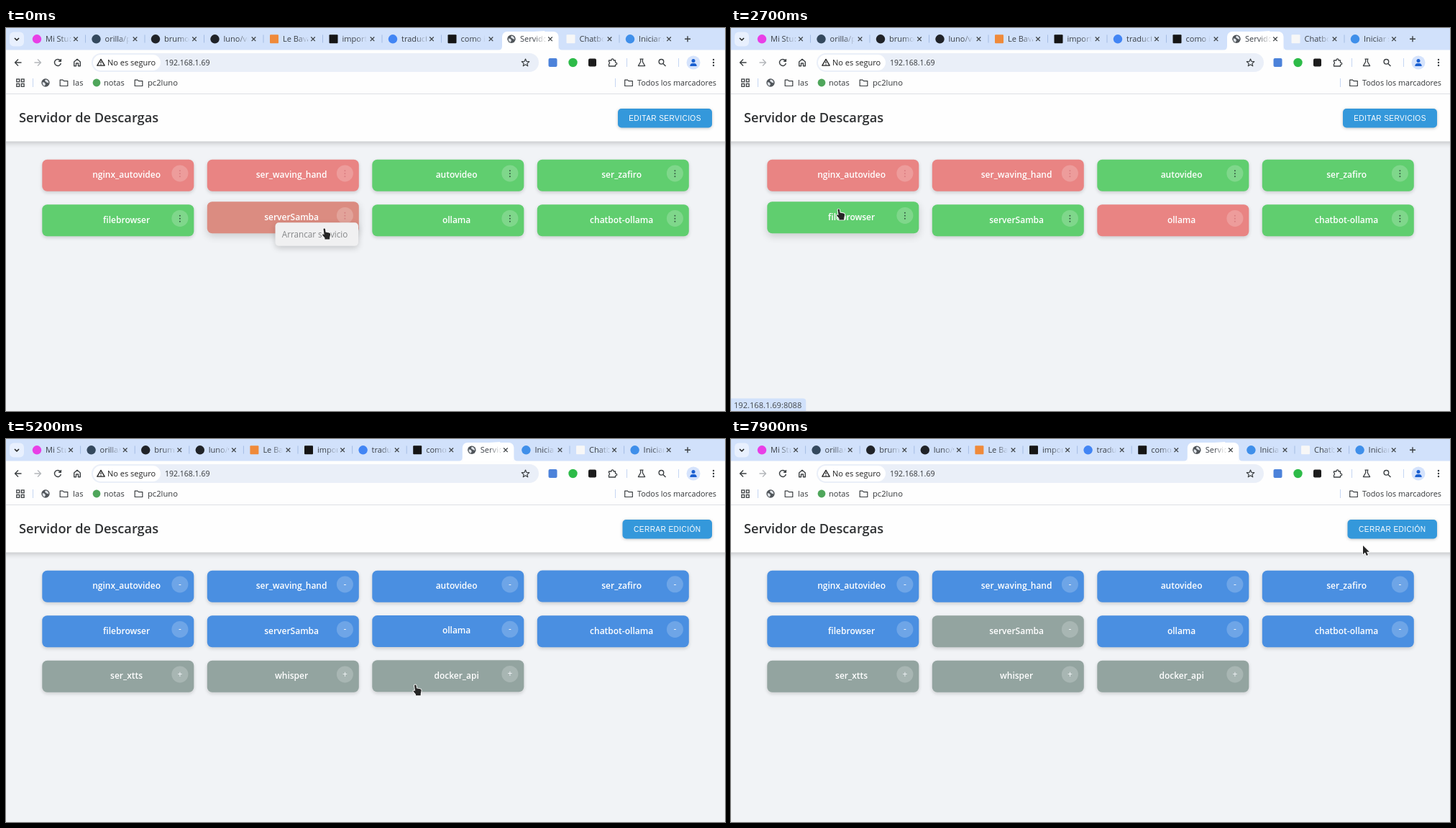
These frames come from a looping animation (1000 px wide and 532 px high, 8 s). An HTML page with a canvas:

```html
<!DOCTYPE html>
<html lang="es">
<head>
<meta charset="utf-8">
<title>Servidor de Descargas</title>
<style>
  html, body { margin: 0; width: 100%; height: 100%; overflow: hidden; background: #f1f3f6; }
  canvas { display: block; }
</style>
</head>
<body>
<canvas id="stage" width="1000" height="532"></canvas>
<script>
const c = document.getElementById('stage').getContext('2d');
const LOOP = 8000;
const UI = '"Open Sans", "Noto Sans", sans-serif';
const ARIAL = '"Liberation Sans", Arial, sans-serif';
const ROBOTO = 'Roboto, sans-serif';
const INK = '#3c4043', STRIP = '#d1e1fb';

// Moments of the story, in ms
const T = { started: -30, menuOpen: 1250, stopped: 1700, newTab: 3000, login: 3200,
  bubble: 3400, back: 4000, edit: 4850, removed: 6350 };

// Pointer tip: time, x, y
const PATH = [
  [0, 443, 279], [150, 443, 279], [500, 619, 258], [800, 619, 258], [1150, 701, 260],
  [1300, 701, 260], [1550, 672, 280], [1850, 672, 280], [2400, 150, 252], [2950, 150, 252],
  [3400, 247, 209], [3600, 247, 209], [3930, 668, 14], [4030, 668, 14], [4300, 953, 121],
  [4900, 953, 121], [5300, 500, 382], [5520, 500, 318], [5780, 471, 262], [6850, 471, 262],
  [7550, 879, 148]
];

const RED = [233, 132, 131], GREEN = [96, 206, 111], BLUE = [74, 143, 225], GREY = [147, 164, 160];
const SERVICES = ['nginx_autovideo', 'ser_waving_hand', 'autovideo', 'ser_zafiro',
  'filebrowser', 'serverSamba', 'ollama', 'chatbot-ollama', 'ser_xtts', 'whisper', 'docker_api'];
const PORTS = [8080, 7860, 8501, 8502, 8088, 445, 11434, 3000];

const clamp = v => Math.max(0, Math.min(1, v));
const smooth = v => v * v * (3 - 2 * v);
const mix = (a, b, k) => a.map((v, i) => v + (b[i] - v) * k);
const rgb = v => `rgb(${v.map(Math.round).join()})`;
const ramp = (t, start, length) => clamp((t - start) / length);
const inside = (p, x, y, w, h) => p.x >= x && p.x <= x + w && p.y >= y && p.y <= y + h;

function rect(x, y, w, h, color, r = 0) {
  c.fillStyle = color;
  c.beginPath();
  c.roundRect(x, y, w, h, r);
  c.fill();
}

function disc(x, y, r, color) {
  c.fillStyle = color;
  c.beginPath();
  c.arc(x, y, r, 0, Math.PI * 2);
  c.fill();
}

function text(s, x, y, size, color = '#333639', { font = UI, weight = 400, align = 'left', gap = 0 } = {}) {
  c.font = `${weight} ${size}px ${font}`;
  c.letterSpacing = gap + 'px';
  c.textAlign = align;
  c.fillStyle = color;
  c.fillText(s, x, y);
  c.letterSpacing = '0px';
}

function icon(d, x, y, color = INK, width = 1.4, fill = false) {
  c.save();
  c.translate(x, y);
  c.strokeStyle = c.fillStyle = color;
  c.lineWidth = width;
  c.lineJoin = 'round';
  const p = new Path2D(d);
  if (fill) c.fill(p); else c.stroke(p);
  c.restore();
}

function shadowed(blur, dy, alpha, draw) {
  c.save();
  c.shadowColor = `rgba(0,0,0,${alpha})`;
  c.shadowBlur = blur;
  c.shadowOffsetY = dy;
  draw();
  c.restore();
}

function dots(x, y, color, gap = 4, r = 1.1) {
  for (let i = -1; i <= 1; i++) disc(x, y + i * gap, r, color);
}

const SHAPE = {
  arrow: 'M4.5 0H-4.5M0 -4.5L-4.5 0L0 4.5',
  forward: 'M-4.5 0H4.5M0 -4.5L4.5 0L0 4.5',
  reload: 'M3.6 -2.8A4.5 4.5 0 1 0 4.4 1M4.4 -5V-1.7H1.1',
  home: 'M-4.3 4.7V-1L0 -4.7L4.3 -1V4.7H1.5V1H-1.5V4.7Z',
  star: 'M0 -5L1.5 -1.6L5.2 -1.3L2.4 1.1L3.2 4.8L0 2.8L-3.2 4.8L-2.4 1.1L-5.2 -1.3L-1.5 -1.6Z',
  puzzle: 'M-5 -3H-1.5A1.6 1.6 0 1 1 1.5 -3H4V0A1.6 1.6 0 1 1 4 3V5H-5V2A1.6 1.6 0 0 0 -5 -1Z',
  flask: 'M-2.5 -4.8H2.5M-1.4 -4.8V-1L-4.6 4.6H4.6L1.4 -1V-4.8',
  search: 'M2.2 -1.2A3.3 3.3 0 1 1 -4.4 -1.2A3.3 3.3 0 1 1 2.2 -1.2ZM1.4 1.4L5 5',
  folder: 'M-5.3 -4.2H-1.5L0 -2.7H5.3V4.2H-5.3Z',
  warn: 'M0 -4.6L5.2 4.2H-5.2ZM0 -1.6V1.3M0 2.2V3.2',
  close: 'M-2.8 -2.8L2.8 2.8M2.8 -2.8L-2.8 2.8',
  plus: 'M-4 0H4M0 -4V4',
  chevron: 'M-3 -1.5L0 1.5L3 -1.5',
  land: 'M-4 -1L-1 0L0 2.5L-1.6 4.4A4.6 4.6 0 0 1 -4 -1ZM0 -4.6L-1 -2.4L1.4 -.6L4.2 .6A4.6 4.6 0 0 0 0 -4.6Z',
  pointer: 'M0 0V12.2L2.9 9.6L4.9 14L7 13L5 8.8H8.8Z',
  hand: 'M-1.5 .6C-1.5 -.8 .8 -.8 1 .6L1.5 4.4L6.5 5.4C8 5.8 8.3 6.8 8 8.4L7.2 12V14.4H.4V12.6L-2.8 8.8C-3.4 7.6 -2 7 -1 7.8L-.4 8.2Z'
};

function globe(x, y) {
  disc(x, y, 5.7, '#50555a');
  icon(SHAPE.land, x, y, '#dfe3e8', 1, true);
}

function cursorAt(t) {
  const i = PATH.findIndex(k => k[0] > t);
  if (i < 0) return { x: PATH.at(-1)[1], y: PATH.at(-1)[2] };
  const a = PATH[Math.max(0, i - 1)], b = PATH[i];
  const k = smooth(ramp(t, a[0], b[0] - a[0] || 1));
  return { x: a[1] + (b[1] - a[1]) * k, y: a[2] + (b[2] - a[2]) * k };
}

const onPanel = t => t < T.newTab || t >= T.back;
const cardPos = i => ({ x: 50.3 + (i % 4) * 229.5, y: 182.7 + Math.floor(i / 4) * 62.5 });

function cardAt(t) {
  if (!onPanel(t)) return -1;
  const p = cursorAt(t), n = t < T.edit ? 8 : 11;
  for (let i = 0; i < n; i++) {
    const { x, y } = cardPos(i);
    if (inside(p, x, y, 211, 44)) return i;
  }
  return -1;
}

function onButton(t) {
  const x = t < T.edit ? 851 : 857;
  return onPanel(t) && inside(cursorAt(t), x, 111, 982 - x, 27);
}

// Share of the last moments for which a test held: gives hover transitions
function hover(t, test) {
  let n = 0;
  for (let k = 0; k < 10; k++) n += test(Math.max(0, t - k * 25)) ? 1 : 0;
  return smooth(n / 10);
}

function cardColor(i, t) {
  if (t >= T.edit) {
    if (i > 7) return GREY;
    return i === 5 ? mix(BLUE, GREY, ramp(t, T.removed, 300)) : BLUE;
  }
  if (i === 5) return mix(RED, GREEN, ramp(t, T.started, 300));
  if (i === 6) return mix(GREEN, RED, ramp(t, T.stopped, 250));
  return i < 2 ? RED : GREEN;
}

function drawCard(i, t) {
  const { x, y: top } = cardPos(i);
  const up = hover(t, s => cardAt(s) === i), y = top - 4 * up;
  const color = cardColor(i, t), edit = t >= T.edit;
  shadowed(5 + 6 * up, 2 + 2 * up, .16, () => rect(x, y, 211, 44, rgb(color), 7));
  text(SERVICES[i], x + 117.3, y + 25.4, 12, '#fff', { weight: 600, align: 'center' });

  const bx = x + 191.6, by = y + 19.2;
  const p = cursorAt(t), hot = edit && onPanel(t) && Math.hypot(p.x - bx, p.y - by) < 11.5;
  disc(bx, by, 11.5, `rgba(255,255,255,${hot ? .42 : .2})`);
  if (edit) text(i > 7 ? '+' : '-', bx, by + 4, 12, '#f4f7fa', { align: 'center' });
  else dots(bx, by + .3, color[0] > 180 ? 'rgba(200,100,110,.55)' : 'rgba(35,60,50,.8)', 4, 1);
}

function drawMenu(i, label, alpha) {
  if (alpha <= 0) return;
  const { x, y } = cardPos(i);
  c.save();
  c.globalAlpha = alpha;
  shadowed(8, 3, .18, () => rect(x + 94.7, y + 25, 115.5, 32.5, '#f0f0f1', 5));
  text(label, x + 104, y + 45.3, 11.7, '#858789');
  c.restore();
}

function drawButton(t) {
  const edit = t >= T.edit, x = edit ? 857.5 : 851, w = 982 - x;
  const k = hover(t, onButton), y = 112 - 1.5 * k;
  shadowed(4 + 4 * k, 1 + 2 * k, .22, () =>
    rect(x, y, w, 26.5, rgb(mix([52, 152, 219], [41, 128, 185], k)), 5));
  text(edit ? 'CERRAR EDICIÓN' : 'EDITAR SERVICIOS', x + w / 2, y + 17, 10.1, '#fff',
    { font: ARIAL, align: 'center', gap: .42 });
}

function drawPanel(t) {
  rect(0, 92, 1000, 440, '#f1f3f6');
  shadowed(7, 2, .2, () => rect(-10, 92, 1020, 65.5, '#fefefe'));
  text('Servidor de Descargas', 18, 131, 18.2, '#2f3133', { weight: 600 });
  drawButton(t);

  const over = cardAt(t), n = t < T.edit ? 8 : 11;
  for (let i = 0; i < n; i++) drawCard(i, t);
  const first = 1 - ramp(t, 40, 120);
  const second = ramp(t, T.menuOpen, 100) * (1 - ramp(t, T.stopped + 30, 130));
  drawMenu(5, 'Arrancar servicio', first);
  drawMenu(6, 'Detener servicio', second);

  if (over >= 0 && t < T.edit && first + second <= 0) {
    const url = '192.168.1.69:' + PORTS[over];
    c.font = '11.1px ' + UI;
    rect(0, 514.5, c.measureText(url).width + 10, 18, STRIP, [0, 4, 0, 0]);
    text(url, 4, 527.5, 11.1, '#45494e');
  }
}

function drawLogin(t) {
  rect(0, 92, 1000, 440, '#fefefe');
  if (t < T.login) return;
  disc(500, 228, 24.3, '#3379e6');
  text('File Browser', 500, 291.3, 30.2, '#2f3133', { font: ROBOTO, weight: 700, align: 'center' });
  const box = (y, color) => {
    c.strokeStyle = color;
    c.lineWidth = 1;
    c.strokeRect(402.5, y + .5, 195, 27);
  };
  box(319.5, '#cfcfcf');
  box(353, '#e9e9e9');
  text('Usuario', 415.5, 337.3, 12.1, '#757575', { font: ROBOTO });
  text('Contraseña', 415.5, 370.8, 12.1, '#757575', { font: ROBOTO });
  rect(415.3, 326, 1, 14, '#333');
  rect(402, 387.5, 196, 27.3, '#4490e5', 1);
  text('Iniciar sesión', 500, 405.2, 12.2, '#fff', { font: ROBOTO, align: 'center' });
}

function drawBubble() {
  shadowed(6, 2, .3, () => rect(369.5, 62, 371, 36, '#fff', 8));
  disc(390.5, 79.5, 7.5, '#5b86dc');
  text('inglés', 472, 83.5, 11.7, '#1a5fd0', { align: 'center', weight: 500 });
  text('español', 606.5, 83.5, 11.7, INK, { align: 'center' });
  rect(406, 89.5, 131, 2, '#1a5fd0');
  rect(537, 90.5, 139, 1, '#d9dce1');
  dots(691.5, 79.3, INK, 4, 1.2);
  icon(SHAPE.close, 717, 79, INK, 1.4);
}

// Title, favicon colour, favicon form
const LOGIN_TAB = ['Iniciar sesión', '#3f8fea', 'disc'];
const TABS = [
  ['Mi Studio', '#e83fe6', 'disc'], ['orilla/panel', '#34495e', 'disc'],
  ['brumo/voces', '#202328', 'disc'], ['luno/vídeos', '#202328', 'disc'],
  ['Le Bavard', '#ef8a3a', 'square'], ['importar datos', '#151515', 'square'],
  ['traductor', '#4285f4', 'disc'], ['como instalar', '#151515', 'square'],
  ['Servidor de Descargas', '', 'globe'], ['Chatbot Ollama', '#f7f7f7', 'square'], LOGIN_TAB
];

function drawTabs(t) {
  const opened = t >= T.newTab;
  const tabs = opened ? [...TABS.slice(0, 9), LOGIN_TAB, ...TABS.slice(9)] : TABS;
  const pitch = opened ? 75.6 : 82.5, active = onPanel(t) ? 8 : 9;
  rect(0, 0, 1000, 31, STRIP);
  rect(5, 5.5, 20, 20, '#e8f0fe', 6);
  icon(SHAPE.chevron, 15, 15.5, '#222', 1.6);

  tabs.forEach(([title, color, form], i) => {
    const x = 30 + pitch * i, on = i === active, back = on ? '#ffffff' : STRIP;
    if (on) {
      rect(x, 5, pitch - 4, 27, back, [7, 7, 0, 0]);
      icon('M-6 0Q0 0 0 -6V0Z', x, 31, back, 1, true);
      icon('M6 0Q0 0 0 -6V0Z', x + pitch - 4, 31, back, 1, true);
    } else if (i && i !== active + 1) {
      rect(x - 2.5, 9.5, 1, 11, '#a5bde4');
    }
    if (form === 'globe') globe(x + 13, 15.3);
    else if (form === 'disc') disc(x + 13, 15.3, 6.2, color);
    else rect(x + 7, 9.3, 12, 12, color, 1);

    const w = pitch - 48, end = x + 25 + w;
    c.save();
    c.beginPath();
    c.rect(x + 25, 4, w, 24);
    c.clip();
    text(title, x + 25, 19.3, 11, '#3a3f46');
    const fade = c.createLinearGradient(end - 15, 0, end, 0);
    fade.addColorStop(0, back + '00');
    fade.addColorStop(1, back);
    c.fillStyle = fade;
    c.fillRect(end - 15, 4, 15, 24);
    c.restore();
    icon(SHAPE.close, x + pitch - 15.5, 15.3, INK, 1.2);
  });
  icon(SHAPE.plus, 948, 15.3, INK, 1.4);
}

function drawBars(t) {
  const login = !onPanel(t);
  rect(0, 30.5, 1000, 61, '#fefefe');
  rect(0, 91, 1000, 1, '#dde0e5');
  icon(SHAPE.arrow, 17, 48, login ? '#b4b7bb' : INK);
  icon(SHAPE.forward, 44, 48, '#b4b7bb');
  icon(SHAPE.reload, 72, 48);
  icon(SHAPE.home, 99, 48);

  rect(119, 35, 622, 26, '#eaeff8', 13);
  rect(121, 37, 94, 22, '#fff', 11);
  icon(SHAPE.warn, 132, 48, '#222', 1.3);
  text('No es seguro', 141, 52, 11, '#222', { weight: 500 });
  const url = login && t >= T.login ? '192.168.1.69:8088/login?redirect=/files/' : '192.168.1.69';
  text(url, 221, 52, 10.5);
  if (login && t >= T.bubble) {
    disc(698, 48, 9, '#cdd2da');
    rect(692.5, 42.5, 11, 11, '#494d52', 2);
  }
  icon(SHAPE.star, 722.5, 48, INK, 1.2);

  rect(754.5, 42, 12, 12, '#4c82da', 2);
  disc(788.5, 48, 6.2, '#2dbb48');
  rect(810, 42.5, 11, 11, '#1c1c1c', 2);
  icon(SHAPE.puzzle, 843.5, 48, INK, 1.3);
  rect(863, 42, 1, 12, '#c5d6f2');
  icon(SHAPE.flask, 884, 48, INK, 1.3);
  icon(SHAPE.search, 912.5, 48, INK, 1.4);
  rect(935, 42, 1, 12, '#c5d6f2');
  disc(956, 48, 9.5, '#d5e3fc');
  disc(956, 45.5, 2.5, '#1a5fd0');
  rect(951.3, 49, 9.4, 4, '#1a5fd0', [4, 4, 0, 0]);
  dots(984, 48, INK, 4, 1.2);

  for (const dx of [0, 6.5]) for (const dy of [0, 6.5]) {
    c.strokeStyle = INK;
    c.lineWidth = 1.3;
    c.strokeRect(14.8 + dx, 71 + dy, 3.8, 3.8);
  }
  rect(37, 70, 1, 12, '#c5d6f2');
  globe(55, 76);
  icon(SHAPE.folder, 80.5, 76.3, INK, 1.2);
  text('Ias', 93, 80, 11);
  disc(126, 76, 5.4, '#4fa65b');
  text('notas', 136, 80, 11);
  icon(SHAPE.folder, 184.5, 76.3, INK, 1.2);
  text('pc2luno', 197, 80, 11.2);
  rect(847, 70, 1, 12, '#c5d6f2');
  icon(SHAPE.folder, 866, 76.3, INK, 1.2);
  text('Todos los marcadores', 878, 80, 10.8);
}

function drawCursor(t) {
  const { x, y } = cursorAt(t);
  const d = cardAt(t) >= 0 ? SHAPE.hand : SHAPE.pointer;
  icon(d, x, y, '#fff', 1.8);
  icon(d, x, y, '#262626', 1, true);
}

function draw(t) {
  c.clearRect(0, 0, 1000, 532);
  if (onPanel(t)) drawPanel(t); else drawLogin(t);
  drawTabs(t);
  drawBars(t);
  if (!onPanel(t) && t >= T.bubble) drawBubble();
  drawCursor(t);
}

const begin = performance.now();
function tick() {
  draw((performance.now() - begin) % LOOP);
  requestAnimationFrame(tick);
}
tick();
</script>
</body>
</html>
```
